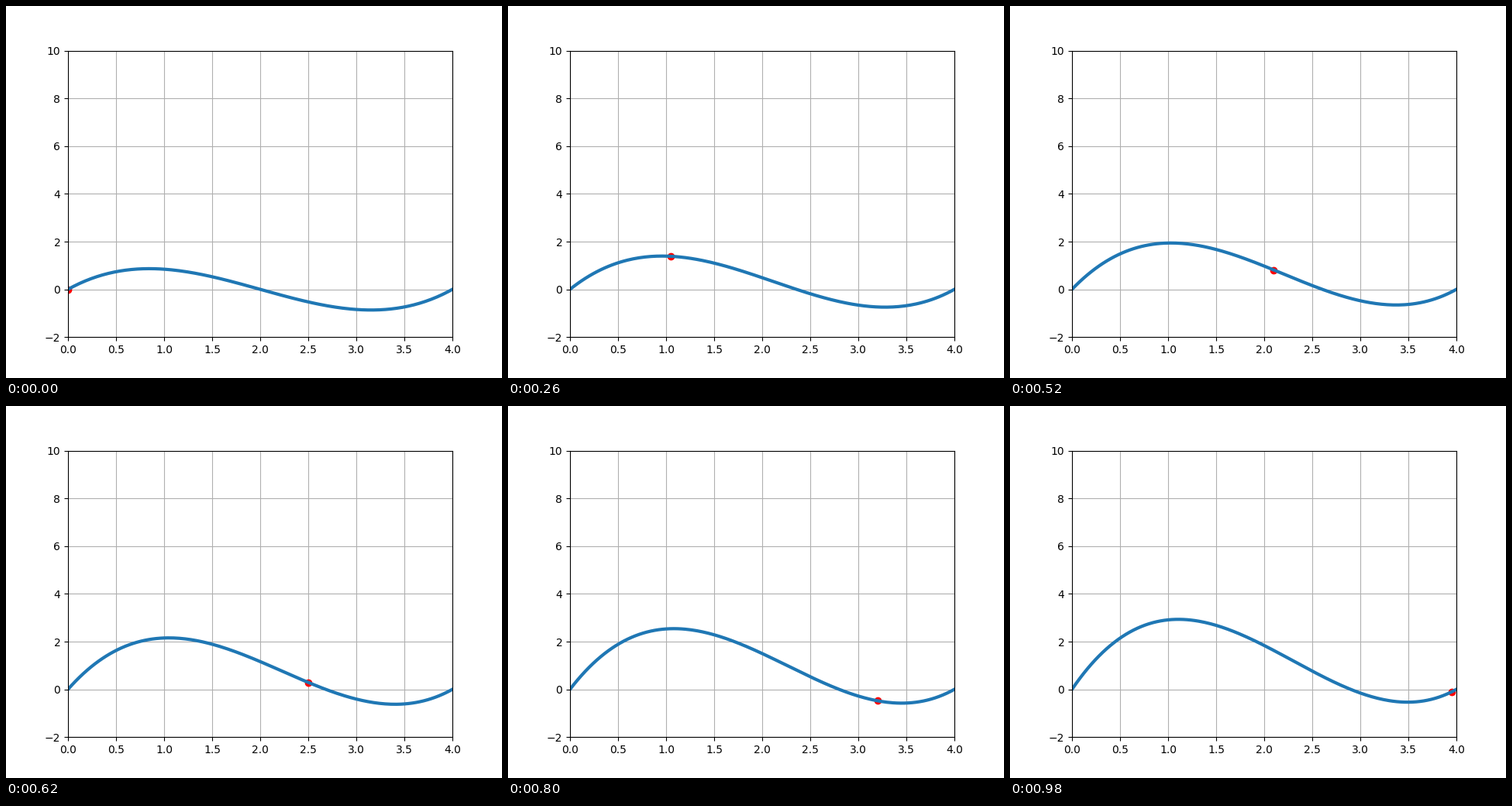
A matplotlib script that plays this animation: 640x480 px, repeating every 1 s.

```python
import math

import matplotlib.pyplot as plt
import numpy as np
from matplotlib.animation import FuncAnimation

FRAMES = 50
SAMPLES = 80
SPAN = 4.0


def bezier(t, lift):
    """Cubic Bezier height with inner control heights `lift` and -3."""
    return 3 * t * (1 - t) ** 2 * lift - 9 * t**2 * (1 - t)


fig, ax = plt.subplots(figsize=(6.4, 4.8), dpi=100)
ax.set_xlim(0, SPAN)
ax.set_ylim(-2, 10)
ax.grid(True)

t = np.linspace(0, 1, 201)
dot, = ax.plot([], [], "ro")
curve, = ax.plot([], [], color="C0", linewidth=3)


def update(frame):
    lift = 3 + 5 * frame / FRAMES
    # The dot moves on a grid of samples finer than the frame steps.
    sample = math.ceil((2 * frame + 1) * SAMPLES / (2 * FRAMES)) - 1
    s = sample / SAMPLES
    curve.set_data(SPAN * t, bezier(t, lift))
    dot.set_data([SPAN * s], [bezier(s, lift)])
    return dot, curve


anim = FuncAnimation(fig, update, frames=FRAMES, interval=20,
                     init_func=lambda: update(0), repeat=True, repeat_delay=0)
plt.show()
```
